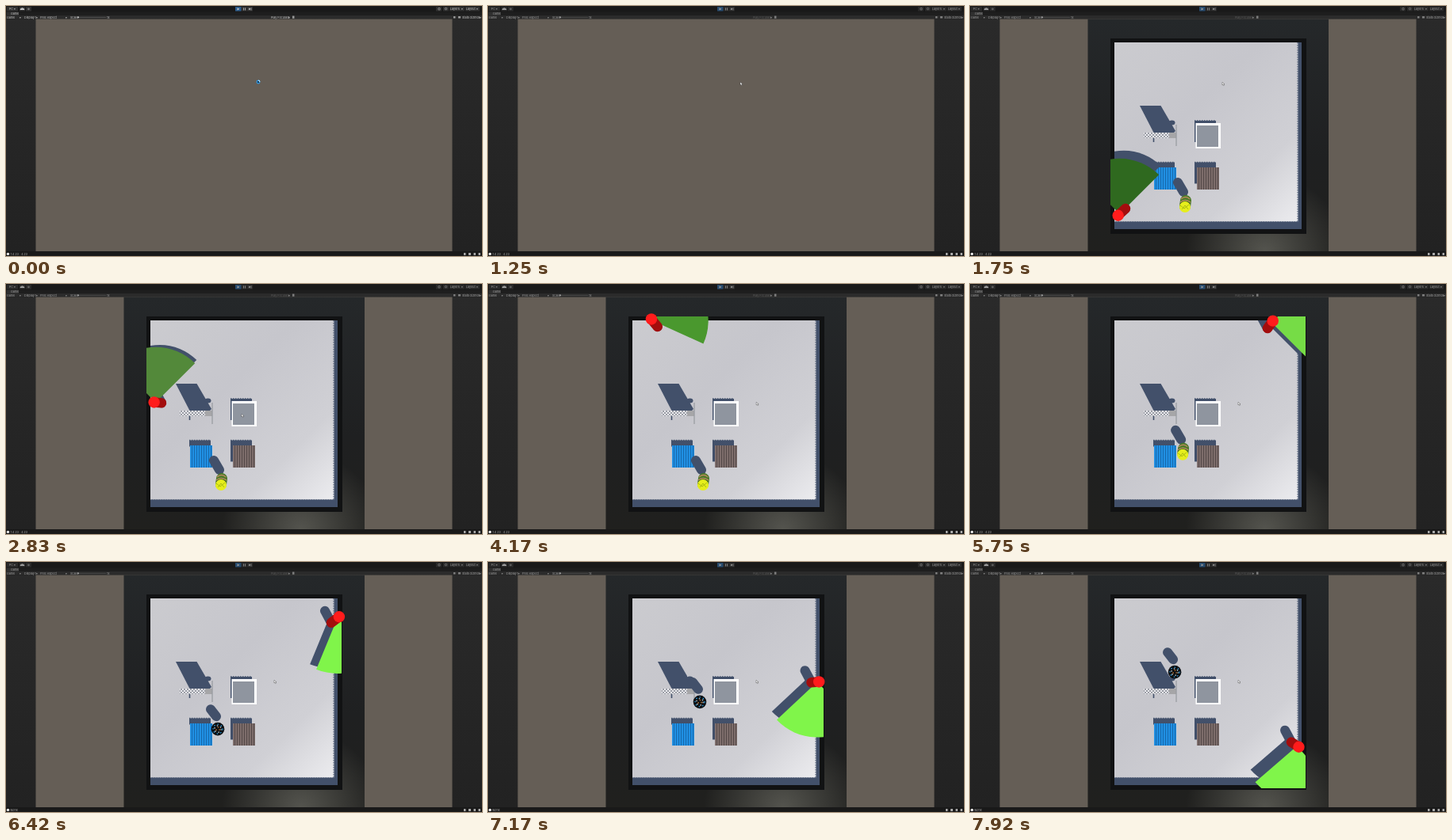
These frames come from a looping animation (600x316 px, 8 s). An HTML page:

```html
<!DOCTYPE html>
<html lang="en">
<head>
<meta charset="utf-8">
<title>Patrol</title>
<style>
html, body { margin: 0; width: 100%; height: 100%; overflow: hidden; background: #191919; }
svg { display: block; width: 100vw; height: 100vh; }
text { font: 3.7px Inter, Arial, sans-serif; }
</style>
</head>
<body>
<svg viewBox="0 0 600 316">
  <defs>
    <linearGradient id="floor" x1="0" y1="0" x2="1" y2="1">
      <stop offset="0" stop-color="#cbcbcf"/>
      <stop offset=".4" stop-color="#c6c6cc"/>
      <stop offset=".75" stop-color="#d0d0d5"/>
      <stop offset="1" stop-color="#ececef"/>
    </linearGradient>
    <linearGradient id="void" x1="0" y1="0" x2="0" y2="1">
      <stop offset="0" stop-color="#25282a"/>
      <stop offset=".6" stop-color="#1f2021"/>
      <stop offset="1" stop-color="#20201e"/>
    </linearGradient>
    <radialGradient id="glow" gradientUnits="userSpaceOnUse" cx="372" cy="312" r="100">
      <stop offset="0" stop-color="#55554f"/>
      <stop offset="1" stop-color="#55554f" stop-opacity="0"/>
    </radialGradient>
    <linearGradient id="side" x1="0" y1="0" x2="0" y2="1">
      <stop offset="0" stop-color="#2a2a2a"/>
      <stop offset="1" stop-color="#222"/>
    </linearGradient>
    <pattern id="blue" width="3" height="4" patternUnits="userSpaceOnUse">
      <path d="M0 0h3v4h-3z" fill="#2090e4"/><path d="M0 0h1v4h-1z" fill="#1769ac"/>
    </pattern>
    <pattern id="brown" width="3" height="4" patternUnits="userSpaceOnUse">
      <path d="M0 0h3v4h-3z" fill="#7d6d6b"/><path d="M0 0h1v4h-1z" fill="#544948"/>
    </pattern>
    <pattern id="check" width="4" height="4" patternUnits="userSpaceOnUse">
      <path d="M0 0h4v4h-4z" fill="#e8e8ec"/><path d="M0 0h2v2h-2zM2 2h2v2h-2z" fill="#9b9ea6"/>
    </pattern>
    <clipPath id="floorClip"><path d="M182 46h236v236h-236z"/></clipPath>
    <clipPath id="coneClip"><path d="M177 41h246v245h-246z"/></clipPath>
  </defs>

  <path d="M0 0h600v316h-600z" fill="#191919"/>
  <path d="M0 7.5h600v4.5h-600z" fill="#1e1e1e"/>
  <path d="M1 7.5h15v4.5h-15z" fill="#303030"/>
  <path d="M0 12h600v4.5h-600z" fill="#2b2b2b"/>
  <path d="M0 16.5h600v293.5h-600z" fill="url(#side)"/>
  <path d="M37.5 16.5h525v293.5h-525z" fill="#655e56"/>

  <g id="view">
    <path d="M148.500 16.500h303.500v293.500h-303.500z" fill="url(#void)"/>
    <path d="M148.500 16.500h303.500v293.500h-303.500z" fill="url(#glow)"/>
    <path d="M177 41h247v247h-247z" fill="#111213"/>
    <path d="M182 46h236v236h-236z" fill="#42506a"/>
    <path d="M182 46h231.500v226.500h-231.500z" fill="url(#floor)"/>
    <path d="M413 46V272.500M413 273H182" fill="none" stroke="#42506a" stroke-dasharray="1.500 1.500"/>
    <g fill="#42506a">
      <path d="M214 126h26.500L259 158l-3 3h-24z"/>
      <ellipse cx="254.500" cy="147.500" rx="4" ry="3"/>
      <path d="M230.700 166h1.600v6h-1.600z"/>
      <path d="M283 145h27v5h-24v22h-3z"/>
      <path d="M231 197.500h27v8h-27z"/>
      <path d="M283 197.500h27v8h-24v19h-3z"/>
      <path d="M231 197.300h27M283 197.300h27M283 144.800h27" stroke="#42506a" stroke-dasharray="1.500 1.500"/>
    </g>
    <path d="M219 160h34v7h-34z" fill="url(#check)"/>
    <path d="M251 160h9v7h-9z" fill="#a6a6a8"/>
    <path d="M260 150v27" stroke="#96999e" stroke-width="1.200"/>
    <path d="M284.500 148h31.500v32h-31.500z" fill="#fff"/>
    <path d="M286 151h27v27h-27z" fill="#8f959f"/>
    <path d="M232 204h28v28h-28z" fill="url(#blue)"/>
    <path d="M286 204h28v28h-28z" fill="url(#brown)"/>

    <g clip-path="url(#floorClip)" fill="#42506a">
      <path id="coneShade"/>
      <path id="guardShade" stroke="#42506a" stroke-width="12" stroke-linecap="round"/>
      <path id="playerShade" stroke="#42506a" stroke-width="12" stroke-linecap="round"/>
    </g>
    <g id="player">
      <g id="bright">
        <path d="M1-5L0 2" stroke="#4c7a2a" stroke-width="14" stroke-linecap="round"/>
        <path d="M-5-7q6-5 11 0M-6-3q6-5 13 0" fill="none" stroke="#b98a5c" stroke-width="1.500"/>
        <path d="M-6-1q6-5 12 0" fill="none" stroke="#22401c" stroke-width="1.500"/>
        <circle cy="3" r="7" fill="#e6ee1c"/>
        <path d="M-6 1l5 4 6-5M-4 6l4-5 4 5" fill="none" stroke="#a3b512" stroke-width=".9"/>
      </g>
      <g id="dark">
        <circle r="8.300" fill="#0c0f12"/>
        <g fill="none" stroke-width="1.300" stroke-dasharray="1.500 3">
          <circle r="6" stroke="#2f9fe0"/>
          <circle r="4.200" stroke="#c9d2d6"/>
          <circle r="2.200" stroke="#c77a35"/>
        </g>
      </g>
    </g>
    <path id="cone" clip-path="url(#coneClip)"/>
    <path id="body" stroke="#a30d0d" stroke-width="12.500" stroke-linecap="round"/>
    <circle id="head" r="7.200" fill="#ff1c1c"/>
  </g>

  <g id="bars" fill="#c4c4c4">
    <g fill="#303030">
      <path d="M1 1h14v5.500h-14zM17 1h7v5.500h-7zM25 1h7v5.500h-7zM297 1h14v5.500h-14zM542 1h7v5.500h-7zM551 1h7v5.500h-7zM559 1h19v5.500h-19zM579 1h18v5.500h-18z"/>
    </g>
    <path d="M289 1h7.500v5.500h-7.500z" fill="#2d5d8c"/>
    <path d="M291.500 2.200l3 1.600-3 1.600zM299 2.200h.8v3.200h-.8zM301 2.200h.8v3.200h-.8zM306 2.200l2.200 1.600-2.200 1.600zM308.500 2.200h.8v3.200h-.8z"/>
    <path d="M18 5a1.200 1.200 0 0 1 1-2 1.800 1.800 0 0 1 3 0 1.200 1.200 0 0 1 1 2z"/>
    <circle cx="28.500" cy="3.800" r="1.400" fill="#777"/>
    <circle cx="546" cy="3.700" r="1.300" fill="none" stroke="#aaa" stroke-width=".7"/>
    <circle cx="554.500" cy="3.500" r="1.200" fill="none" stroke="#aaa" stroke-width=".7"/>
    <path d="M91 14.300h35" stroke="#707070" stroke-width=".6"/>
    <circle cx="91" cy="14.300" r="1.100"/>
    <path d="M361 12.500h2.500v3.300h-2.500zM564 13h2.500v2.500h-2.500zM570 13h3v2.500h-3z" fill="#999"/>
    <g id="labels"></g>
    <text id="focus" x="334" y="15.500">Play Focused</text>
  </g>
  <circle cx="2.500" cy="313.400" r="1.700" fill="#eee"/>
  <text id="status" x="5.500" y="314.800" fill="#aaa"></text>
  <path d="M577 312h2.500v3h-2.500zM583 312h3v3h-3zM589.500 312h2.500v3h-2.500zM595.500 312h2.500v3h-2.500z" fill="#aaa"/>
  <path id="blink" d="M4 4h1.500v1.500h-1.500zM4 312.500h1.500v1.500h-1.500z" fill="#777"/>

  <g id="busy">
    <circle r="1.900" fill="#173a55" stroke="#2f9be8" stroke-width="1.100"/>
    <path d="M0-1.900A1.900 1.900 0 0 1 1.900 0" fill="none" stroke="#bfe6ff" stroke-width="1.100"/>
  </g>
  <path id="mouse" d="M-1-1.700v3.700l1-.8.700 1.400.7-.4-.7-1.400h1.300z" fill="#fff" stroke="#333" stroke-width=".4"/>
</svg>
<script>
const $ = id => document.getElementById(id);
const LOOP = 8000, TICK = 1000 / 12;
const MID = [300, 160], REACH = 70;

// Keys are [seconds, value...]; values between keys are linear.
const GUARD = [[1.7, 196, 261], [3.81, 196, 55], [4, 199, 54], [4.17, 214, 54], [5.17, 317, 56],
  [6.06, 406, 56], [6.2, 410, 58], [6.42, 410, 77], [7.92, 405, 228]];
const FACING = [[3.82, -90], [4.27, 0], [6.08, 0], [6.53, 90], [7.92, 94]];
const TINT = [[1.75, 47, 105, 31], [2.83, 83, 137, 58], [4.17, 74, 152, 46],
  [5.17, 110, 198, 67], [6.42, 128, 245, 74]];
const PLAYER = [[4.85, 271, 251], [5.17, 271, 228], [5.5, 270, 214], [5.9, 267, 212],
  [6.5, 267, 211], [7.3, 267, 170], [7.92, 258, 139]];
const MOUSE = [[2.2, 319, 98], [2.75, 298, 166], [3.05, 298, 166], [3.6, 340, 151], [4.3, 339, 151]];

function at(keys, s) {
  const n = keys.findIndex(k => k[0] > s);
  if (n === 0) return keys[0].slice(1);
  if (n < 0) return keys[keys.length - 1].slice(1);
  const a = keys[n - 1], b = keys[n], u = (s - a[0]) / (b[0] - a[0]);
  return a.slice(1).map((v, i) => v + (b[i + 1] - v) * u);
}

const lift = (p, k) => p.map((v, i) => v + (v - MID[i]) * k);
const shift = (p, x, y) => [p[0] + x, p[1] + y];
const line = (a, b) => `M${a}L${b}`;
const move = (id, p, more = '') => $(id).setAttribute('transform', `translate(${p})${more}`);
const show = (id, on) => $(id).setAttribute('visibility', on ? 'inherit' : 'hidden');

function sector(p, deg, r) {
  const tip = d => {
    const a = (deg + d) * Math.PI / 180;
    return shift(p, r * Math.cos(a), r * Math.sin(a));
  };
  return `M${p}L${tip(-45)}A${r} ${r} 0 0 1 ${tip(45)}Z`;
}

const LABELS = [[4, 5, 'PC ▾'], [560, 5, 'Layers'], [574, 5, '▾'], [580, 5, 'Layout'], [593, 5, '▾'],
  [6, 11, 'Game'], [1, 15.5, 'Game'], [17, 15.5, '▾'], [23, 15.5, 'Display 1'], [38, 15.5, '▾'],
  [43, 15.5, 'Free Aspect'], [75, 15.5, '▾'], [81, 15.5, 'Scale'], [127, 15.5, '1x'],
  [356, 15.5, '▾'], [575, 15.5, 'Stats'], [584.5, 15.5, 'Gizmos'], [597, 15.5, '▾']];
for (const [x, y, str] of LABELS) {
  const el = document.createElementNS('http://www.w3.org/2000/svg', 'text');
  el.setAttribute('x', x);
  el.setAttribute('y', y);
  el.textContent = str;
  $('labels').append(el);
}

function draw(ms) {
  const step = Math.floor((ms + 4) / TICK), s = step * TICK / 1000;
  const playing = s >= 1.24, swapped = s >= 5.9;

  $('bars').setAttribute('opacity', playing ? .75 : 1);
  $('focus').setAttribute('opacity', playing ? .4 : 1);
  $('status').textContent = swapped ? 'None' : '1:4:23 : 4:23';
  show('blink', !playing && step % 4 > 0);
  show('busy', !playing);
  show('mouse', playing);
  move('busy', [318, 96], ` rotate(${s > .5 ? step * 40 : 0})`);
  move('mouse', at(MOUSE, s));
  show('view', s >= 1.41);

  const base = at(GUARD, s), head = lift(base, .09), deg = at(FACING, s)[0];
  $('cone').setAttribute('d', sector(lift(base, .07), deg, REACH));
  $('cone').setAttribute('fill', `rgb(${at(TINT, s).map(Math.round)})`);
  $('coneShade').setAttribute('d', sector(shift(base, -2, -8), deg, REACH / 1.07));
  $('guardShade').setAttribute('d', line(base, shift(base, -8, -15)));
  $('body').setAttribute('d', line(base, head));
  move('head', head);

  const p = at(PLAYER, s);
  move('player', p);
  $('playerShade').setAttribute('d', line(shift(p, -2, -16), shift(p, -9, -28).map((v, i) => swapped && i ? v + 3 : v)));
  show('bright', !swapped);
  show('dark', swapped);
}

const start = performance.now();
function frame() {
  draw((performance.now() - start) % LOOP);
  requestAnimationFrame(frame);
}
frame();
</script>
</body>
</html>
```
